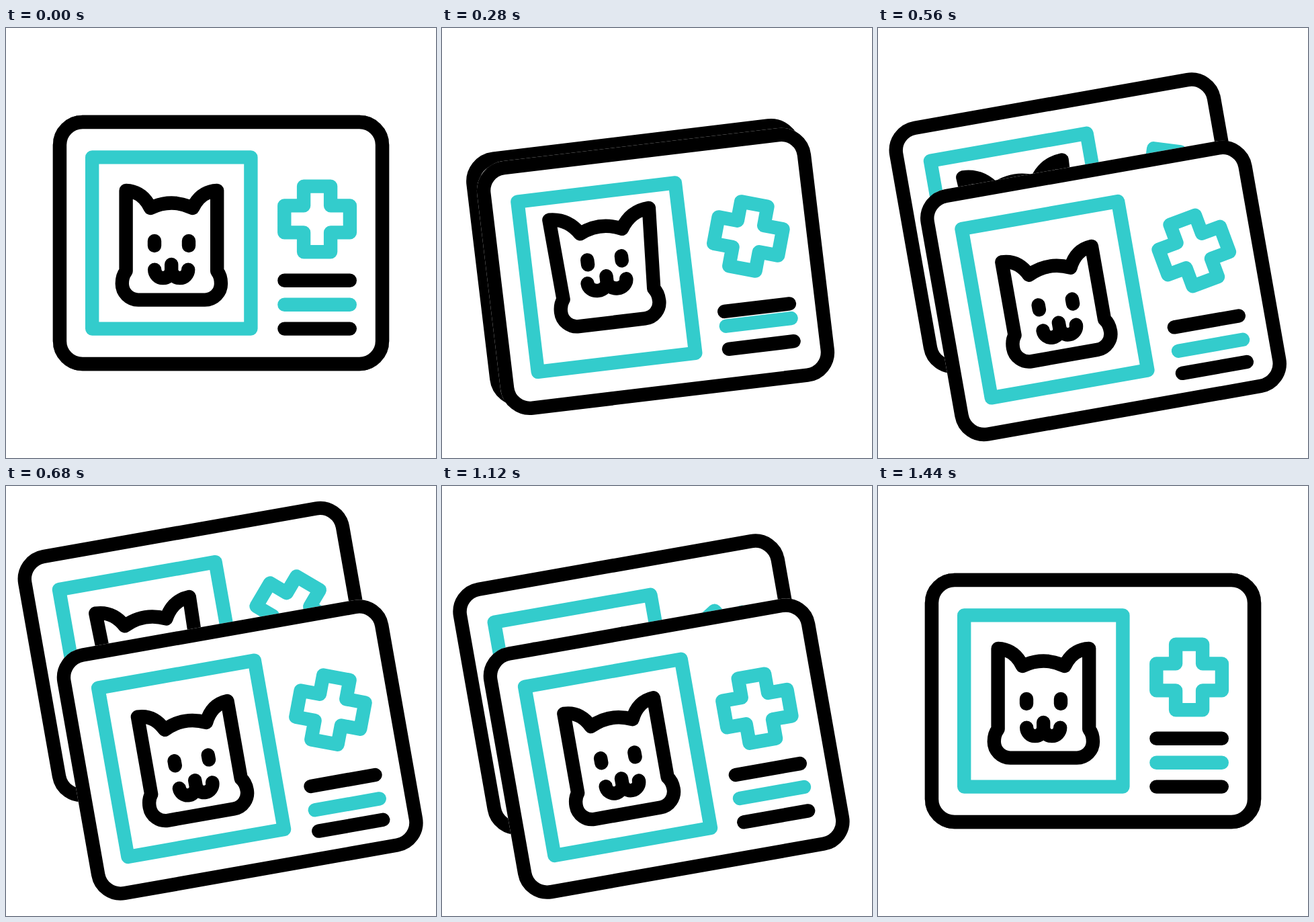
These frames come from a looping animation (640x640 px, 1.48 s). An HTML page:

```html
<!DOCTYPE html>
<html lang="en">
<head>
<meta charset="utf-8">
<title>Pet cards</title>
<style>
  html, body { margin: 0; width: 100%; height: 100%; overflow: hidden; background: #fff; }
  svg { display: block; width: 100%; height: 100%; }
  .line { fill: none; stroke: #000; stroke-width: 20.4; stroke-linecap: round; stroke-linejoin: round; }
  .teal { stroke: #33cccc; }
</style>
</head>
<body>
<svg id="stage" viewBox="0 0 640 640"></svg>
<script>
const LOOP = 1480, STEP = 40, LAG = 280;
const stage = document.getElementById('stage');

function add(parent, tag, attrs) {
  const el = document.createElementNS('http://www.w3.org/2000/svg', tag);
  for (const k in attrs) el.setAttribute(k, attrs[k]);
  parent.appendChild(el);
  return el;
}

// Eased 0..1 between two times
function ease(t, a, b) {
  const x = Math.min(1, Math.max(0, (t - a) / (b - a)));
  return x * x * (3 - 2 * x);
}
// Rises over a..b, falls over c..d
const hump = (t, a, b, c, d) => ease(t, a, b) - ease(t, c, d);

// Jump to "up", land at "squash", settle at 0
function hop(t, up, squash) {
  return up * ease(t, 80, 280) + (squash - up) * ease(t, 280, 540) - squash * ease(t, 540, 760);
}

function headPath(base, top, spread) {
  const tip = 242 + top, notch = 268 + top, low = 362 + base;
  const l = 178.6 - spread, r = 314.2 + spread;
  return `M${l} ${tip}Q${203 - spread / 2} ${tip + 1} 215 ${notch}` +
    `Q246.4 ${notch - 15} 277.8 ${notch}Q${289.8 + spread / 2} ${tip + 1} ${r} ${tip}` +
    `L314.2 ${low}Q320 ${low + 7} 320 ${low + 18.6}a24 24 0 0 1 -24 24` +
    `H196.8a24 24 0 0 1 -24 -24Q172.8 ${low + 7} 178.6 ${low}Z`;
}

function makeCard() {
  const g = add(stage, 'g', {});
  const line = (tag, attrs, teal) =>
    add(g, tag, { class: teal ? 'line teal' : 'line', ...attrs });
  add(g, 'rect', { x: 69.8, y: 129.8, width: 500.4, height: 380.4, rx: 44.2, fill: '#fff' });
  line('rect', { x: 80, y: 140, width: 480, height: 360, rx: 34 });
  line('path', { d: 'M128.2 192.4H364.4V447.6H128.2Z' }, true);
  const head = line('path', {});
  const eyes = line('path', { d: 'M221 317v7M272 317v7' });
  const mouth = line('path', {
    d: 'M-25 359.6a12.5 12.5 0 0 0 25 0a12.5 12.5 0 0 0 25 0M0 352v8'
  });
  const plus = line('path', {
    d: 'M-20 -48.8H20V-20H48.8V20H20V48.8H-20V20H-48.8V-20H-20Z'
  }, true);
  const bars = [0, 1, 2].map(i =>
    line('path', { d: `M414.4 ${375.8 + 35.9 * i}H511.8` }, i === 1));

  return function pose(x, y, angle, t) {
    const move = (el, v) => el.setAttribute('transform', v);
    move(g, `translate(${x} ${y}) rotate(${-angle}) translate(-320 -320)`);
    const spread = hump(t, 80, 280, 280, 500);
    const base = -17 * hump(t, 80, 280, 280, 480);
    head.setAttribute('d', headPath(base, hop(t, -17, 9.6), 7 * spread));
    move(eyes, `translate(0 ${hop(t, -26, 7)})`);
    move(mouth, `translate(246.2 ${hop(t, -34, 3)})`);
    mouth.setAttribute('d',
      `M${-25 - 4 * spread} 359.6Q${-25 - 4 * spread} 372.1 -12.5 372.1` .replace(/Q.*/, '') +
      `A${12.5 + 2 * spread} 12.5 0 0 0 0 359.6` +
      `A${12.5 + 2 * spread} 12.5 0 0 0 ${25 + 4 * spread} 359.6M0 352v8`);
    move(plus, `translate(463.1 284.4) rotate(${180 * ease(t, 80, 1120)})`);
    bars.forEach((bar, i) => {
      const down = 80 + 160 * i, up = 930 - 160 * i;
      move(bar, `translate(0 ${15.6 * hump(t, down, down + 210, up, up + 210)})`);
    });
  };
}

const back = makeCard();
const front = makeCard();

function draw(t) {
  const angle = 10 * hump(t, 80, 400, 1220, 1440);
  const a = hump(t, 80, 400, 1240, 1440);   // tilt away from rest
  const b = hump(t, 393, 680, 1005, 1262);  // slide apart
  back(
    320 - 28 * a ** 1.2 - 2 * b - 20 * b * (1 - b) ** 2,
    320 + 42 * a - 115.5 * b,
    angle, t - LAG);
  front(
    320 - a - 6 * a * (1 - a) + 29.2 * b ** 1.2,
    320 + 62 * a + 11 * (1 - (1 - b) ** 2),
    angle, t);
}

const start = performance.now();
function tick() {
  const t = (performance.now() - start) % LOOP;
  draw(Math.floor(t / STEP) * STEP);
  requestAnimationFrame(tick);
}
tick();
</script>
</body>
</html>
```
